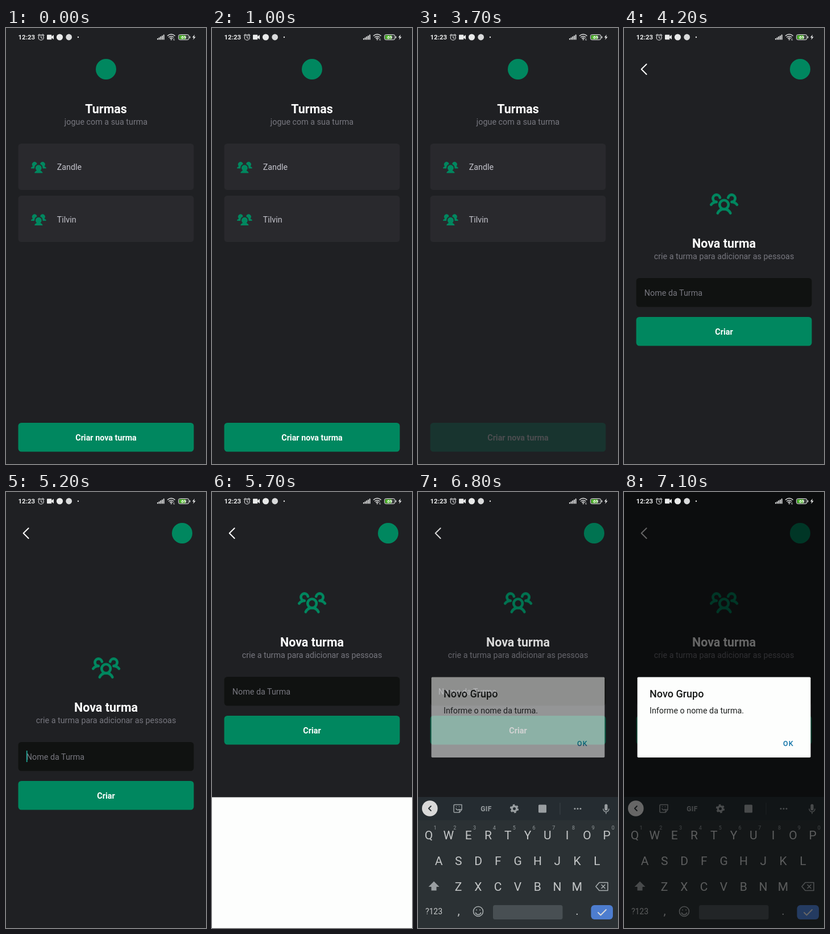
An HTML page that plays this animation: 352 px wide and 762 px high, repeating every 8000 ms.

```html
<!DOCTYPE html>
<html lang="pt-BR">
<head>
<meta charset="utf-8">
<title>Turmas</title>
<style>
html, body { margin: 0; width: 100%; height: 100%; overflow: hidden; background: #1f2023; }
svg { display: block; }
#stage { width: 352px; height: 762px; font-family: Roboto, sans-serif; font-size: 14.33px; }
text { white-space: pre; }
.mid, #keys text { text-anchor: middle; }
.title { font-size: 21.5px; font-weight: 700; fill: #fff; }
.muted { fill: #77777f; }
.item { fill: #c4c4cc; }
.label { font-weight: 700; fill: #fff; }
.green { fill: #00875f; }
.line { fill: none; stroke-linecap: round; stroke-linejoin: round; }
#keys { fill: #e6e9ea; font-size: 21px; }
#keys .hint { font-size: 9px; fill: #a9b0b3; }

/* One 8 s loop; every state is held until the next key time. */
.anim { animation: 8s step-end infinite; transform-origin: 176px 381px; }
#home { animation-name: home; }
#create { animation-name: create; }
#newButton { animation-name: press-new; }
#createButton { animation-name: press-create; }
#form { animation-name: lift; }
#caret { animation-name: blink; }
#blank { animation-name: blank; }
#keyboard { animation-name: slide; }
#dim { animation-name: dim; }
#dialog { animation-name: dialog; }

@keyframes home {
  0% { opacity: 1; transform: none; }
  50% { opacity: 1; transform: scale(1.05); }
  51.25% { opacity: 1; transform: scale(1.12); }
  52.5%, 100% { opacity: 0; transform: none; }
}
@keyframes create {
  0% { opacity: 0; transform: scale(.85); }
  50% { opacity: .6; transform: scale(.92); }
  51.25% { opacity: 1; transform: scale(.985); }
  52.5%, 100% { opacity: 1; transform: none; }
}
@keyframes press-new { 0% { opacity: 1; } 46.25%, 100% { opacity: .2; } }
@keyframes press-create {
  0% { opacity: 1; }
  83.75% { opacity: .4; }
  85% { opacity: .7; }
  86.25% { opacity: .92; }
  87.5%, 100% { opacity: 1; }
}
@keyframes lift { 0% { transform: none; } 71.25%, 100% { transform: translateY(-114px); } }
@keyframes blink {
  0% { opacity: 0; }
  65% { opacity: 1; }
  71.25% { opacity: 0; }
  77.5% { opacity: 1; }
  83.75%, 100% { opacity: 0; }
}
@keyframes blank { 0% { opacity: 0; } 71.25%, 100% { opacity: 1; } }
@keyframes slide {
  0% { transform: translateY(232px); }
  72.5% { transform: translateY(130px); }
  73.75% { transform: translateY(42px); }
  75% { transform: translateY(8px); }
  76.25%, 100% { transform: none; }
}
@keyframes dim {
  0% { opacity: 0; }
  85% { opacity: .15; }
  86.25% { opacity: .35; }
  87.5% { opacity: .52; }
  88.75%, 100% { opacity: .6; }
}
@keyframes dialog { 0% { opacity: 0; } 85% { opacity: .54; } 86.25%, 100% { opacity: 1; } }
</style>
</head>
<body>
<svg id="stage" viewBox="0 0 352 762">
  <defs>
    <path id="side" d="M64 148a4 4 0 0 1-4 4H16a8 8 0 0 1-7.8-6.2 8.4 8.4 0 0 1 1.6-6.9A67.8 67.8 0 0 1 37 117.5a40 40 0 1 1 66.5-35.8 4 4 0 0 1-2.3 4.2A64 64 0 0 0 64 144Z"/>
    <g id="group" class="green" transform="scale(.112)">
      <use href="#side"/>
      <use href="#side" transform="matrix(-1 0 0 1 256 0)"/>
      <path d="M157.2 182a48 48 0 1 0-58.4 0A72 72 0 0 0 65.6 212a8 8 0 0 0 6.9 12h111a8 8 0 0 0 6.9-12A72 72 0 0 0 157.2 182Z"/>
    </g>
    <path id="sideLine" d="M12 140a60 60 0 0 1 48-24A32 32 0 1 1 91.4 78"/>
  </defs>
  <rect width="352" height="762" fill="#1f2023"/>

  <g id="home" class="anim">
    <rect width="352" height="762" fill="#1f2023"/>
    <circle cx="176" cy="72" r="18" class="green"/>
    <text x="176" y="148.5" class="mid title">Turmas</text>
    <text x="176" y="169" class="mid muted">jogue com a sua turma</text>
    <g fill="#29292d">
      <rect x="21.5" y="202" width="309" height="81" rx="5.5"/>
      <rect x="21.5" y="293" width="309" height="81" rx="5.5"/>
    </g>
    <use href="#group" x="0" transform="translate(43 228.5)"/>
    <use href="#group" x="0" transform="translate(43 320)"/>
    <text x="89.7" y="248" class="item">Zandle</text>
    <text x="89.7" y="339.5" class="item">Tilvin</text>
    <g id="newButton" class="anim">
      <rect x="21.5" y="690" width="309" height="50.5" rx="5.5" class="green"/>
      <text x="176" y="721" class="mid label">Criar nova turma</text>
    </g>
  </g>

  <g id="create" class="anim">
    <rect width="352" height="762" fill="#1f2023"/>
    <path d="M39.6 63.2 30.6 72l9 9" class="line" stroke="#fff" stroke-width="1.9"/>
    <circle cx="310" cy="72" r="18" class="green"/>
    <g id="form" class="anim">
      <g transform="translate(151 281.3) scale(.196)" class="line" stroke="#00875f" stroke-width="24">
        <circle cx="128" cy="140" r="40"/>
        <path d="M70.4 216a64.1 64.1 0 0 1 115.2 0"/>
        <use href="#sideLine"/>
        <use href="#sideLine" transform="matrix(-1 0 0 1 256 0)"/>
      </g>
      <text x="176" y="383.7" class="mid title">Nova turma</text>
      <text x="176" y="404.2" class="mid muted">crie a turma para adicionar as pessoas</text>
      <rect x="21.5" y="437" width="309" height="50.5" rx="5.5" fill="#101211"/>
      <text x="35.8" y="467.8" class="muted">Nome da Turma</text>
      <rect id="caret" class="anim" x="35.8" y="452" width="1.8" height="20" fill="#1fa193"/>
      <g id="createButton" class="anim">
        <rect x="21.5" y="505" width="309" height="50.5" rx="5.5" class="green"/>
        <text x="176" y="536" class="mid label">Criar</text>
      </g>
    </g>
  </g>

  <rect id="blank" class="anim" y="533.5" width="352" height="229" fill="#fdfefd"/>

  <g id="keyboard" class="anim">
    <rect y="533" width="352" height="229" fill="#323a3d"/>
    <rect y="533" width="352" height="40.5" fill="#2b343a"/>
    <circle cx="20.8" cy="553" r="13.8" fill="#fff"/>
    <path d="M22.8 549l-4 4 4 4" class="line" stroke="#30383c" stroke-width="1.8"/>
    <g class="line" stroke="#b4babd" stroke-width="1.5">
      <path d="M64.5 546.5h12.5v8.5l-4 5h-8.5a1.5 1.5 0 0 1-1.5-1.5v-10.500a1.500 1.500 0 0 1 1.500-1.500M77 555h-4v4.500M67 553.500q2.500 4 5 1M67.500 550h.1M72.500 550h.1"/>
      <circle cx="169.500" cy="553.500" r="4.200" stroke-width="3.400"/>
      <circle cx="169.500" cy="553.500" r="6.400" stroke-width="2.600" stroke-linecap="butt" stroke-dasharray="3.350"/>
      <path d="M250 543.500v20" stroke="#465055" stroke-width="1"/>
      <path d="M326 554a5 5 0 0 0 10 0M331 559.500v2.500"/>
    </g>
    <g fill="#b4babd">
      <text x="120" y="557.700" class="mid" font-size="12" font-weight="700" letter-spacing=".4">GIF</text>
      <rect x="212" y="546.500" width="14" height="14" rx="1.500"/>
      <circle cx="276" cy="553.500" r="1.500"/>
      <circle cx="281" cy="553.500" r="1.500"/>
      <circle cx="286" cy="553.500" r="1.500"/>
      <rect x="328.400" y="545.500" width="5.200" height="11" rx="2.600"/>
      <path d="M28 680.500l9.500 9.500h-5v6.500h-9v-6.500h-5z"/>
    </g>
    <g id="keys"></g>
    <g class="line" stroke="#c3c9cb" stroke-width="1.600">
      <path d="M319 682.500h15v14h-15l-6-7zM323 686.500l6 6M329 686.500l-6 6"/>
      <circle cx="106" cy="733" r="8.500"/>
      <path d="M101.500 735.500a4.800 4.800 0 0 0 9 0M103 730.500h.1M109 730.500h.1" stroke-width="1.800"/>
    </g>
    <rect x="132" y="722" width="122.500" height="25" rx="3.500" fill="#555d61"/>
    <rect x="304.500" y="722" width="38.500" height="25" rx="6" fill="#5b93f3"/>
    <path d="M317 735l4.500 4.500 9.500-9.500" class="line" stroke="#fff" stroke-width="1.900"/>
  </g>

  <rect id="dim" class="anim" width="352" height="762"/>

  <g id="dialog" class="anim">
    <rect x="23.500" y="323.500" width="305" height="140.500" rx="1.800" fill="#fdfefd"/>
    <text x="45" y="359" font-size="18" font-weight="500" fill="#151716">Novo Grupo</text>
    <text x="45" y="386.500" fill="#1d201f">Informe o nome da turma.</text>
    <text x="280" y="444" font-size="12.500" font-weight="500" letter-spacing="1.100" fill="#0b70a6">OK</text>
  </g>

  <g id="status" fill="#e9eaea">
    <text x="21.500" y="20" font-size="11.500" font-weight="700">12:23</text>
    <g class="line" stroke="#d9dadb" stroke-width="1.200">
      <circle cx="61.700" cy="16.700" r="4.500"/>
      <path d="M61.700 14v3l2 1M56.500 13l2.300-2M66.900 13l-2.300-2"/>
    </g>
    <rect x="72" y="11.800" width="8.300" height="8.500" rx="1"/>
    <path d="M80 15l4-3v8l-4-3z"/>
    <circle cx="94.500" cy="16" r="5.600"/>
    <circle cx="110.700" cy="16" r="5.400" fill="#d9dadb"/>
    <circle cx="127" cy="16" r="1.200"/>
    <g id="bars"></g>
    <g class="line" stroke="#e0e1e1" stroke-width="1.500">
      <path d="M284.500 13.500a9 9 0 0 1 12.600 0M286.700 16a6 6 0 0 1 8.200 0M288.800 18.300a3 3 0 0 1 4 0"/>
    </g>
    <circle cx="290.800" cy="20.300" r="1.100"/>
    <text x="294" y="21.500" font-size="5.500">6</text>
    <rect x="303.500" y="11.500" width="18.500" height="9.200" rx="2.800" fill="#3c4040" stroke="#e0e1e1"/>
    <path d="M306.500 12.800h9.500v6.600h-9.500a1.700 1.700 0 0 1-1.700-1.700v-3.200a1.700 1.700 0 0 1 1.700-1.700" fill="#4fb52c"/>
    <rect x="323" y="14.300" width="1.300" height="3.600" rx=".6"/>
    <text x="312.800" y="19" class="mid" font-size="8" font-weight="700" fill="#fff">69</text>
    <path d="M332 11.500l-4.200 5h2.600l-1.200 4.300 4.600-5.400h-2.800z"/>
  </g>
</svg>
<script>
const add = (parent, tag, attrs, content = '') => {
  const node = document.createElementNS('http://www.w3.org/2000/svg', tag);
  for (const name in attrs) node.setAttribute(name, attrs[name]);
  node.textContent = content;
  document.getElementById(parent).append(node);
};
const key = (label, x, y, attrs = {}) => add('keys', 'text', { x, y, ...attrs }, label);

const pitch = 34.8;
[['QWERTYUIOP', 19, 606.5], ['ASDFGHJKL', 36.5, 651.5], ['ZXCVBNM', 71, 696.5]]
  .forEach(([letters, x, y]) => [...letters].forEach((c, i) => key(c, x + i * pitch, y)));
[...'1234567890'].forEach((c, i) => key(c, 30 + i * pitch, 590, { class: 'hint' }));
key('?123', 28, 738, { 'font-size': 14 });
key(',', 71.5, 739);
key('.', 280, 739);

for (let i = 0; i < 5; i++) {
  const height = 2.5 + i * 1.6;
  add('bars', 'rect', { x: 266 + i * 2.7, y: 20.5 - height, width: 1.8, height, rx: .5 });
}
</script>
</body>
</html>
```
